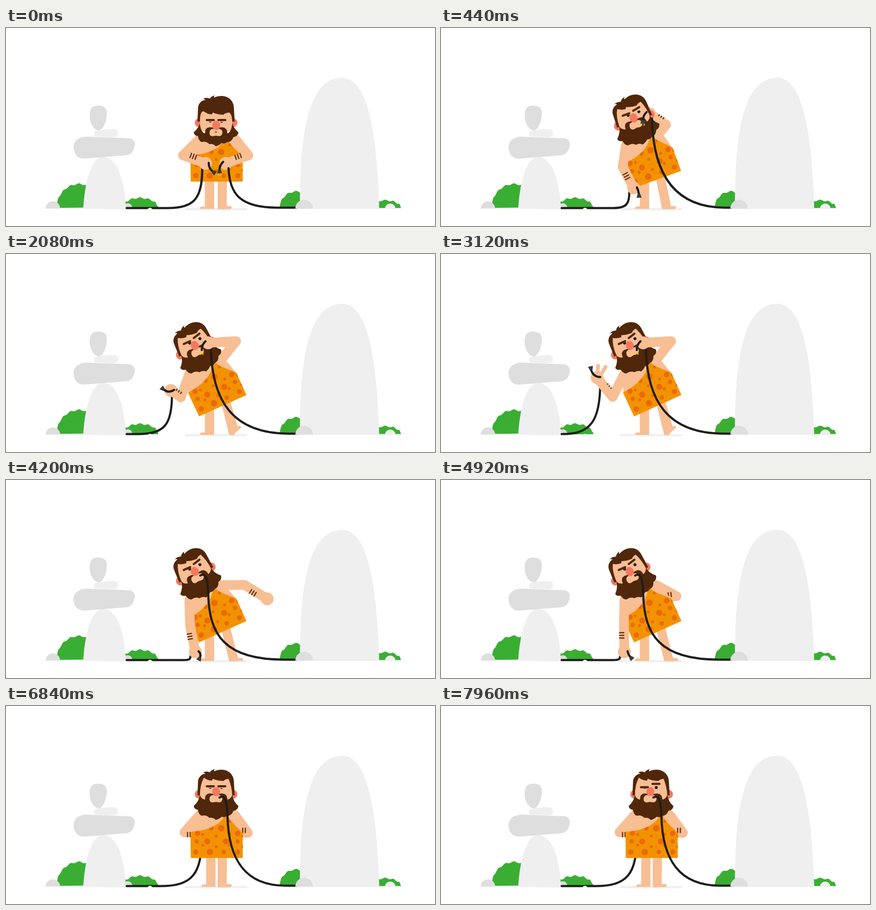
These frames come from a looping animation (800x370 px, 8000 ms). An HTML page with a canvas:

```html
<!DOCTYPE html>
<html lang="en">
<head>
<meta charset="utf-8">
<title>Caveman with a cable</title>
<style>
html, body { margin: 0; width: 100%; height: 100%; overflow: hidden; background: #fff; }
canvas { display: block; }
</style>
</head>
<body>
<canvas id="stage" width="800" height="370"></canvas>
<script>
const ctx = document.getElementById('stage').getContext('2d');
const LOOP = 8000, GROUND = 336.5;
const SKIN = '#f8be94', HAIR = '#50270a', PINK = '#f4795f', ORANGE = '#f39200', SPOT = '#ea6a0a';
const GREEN = '#3aae33', LIGHT = '#efefef', GREY = '#dedede', BLACK = '#1d1d1b', BAND = '#6b3410';

// Elbow x, y, hand x, y, stripe offset
// and for the left: cable offset, plug angle, plug length, plug bend
const LEFT = {
  hold: [330, 238, 372, 253, -5, -6, 1.1, 19, 5],
  ground: [343, 270, 353, 321, 5, -9, 1.4, 13, -5],
  raised: [320, 267, 291, 231, 12, 6, 3.86, 23, -9],
  rest: [341, 268, 342, 321, 5, -8, 1.1, 13, 2],
  hip: [333, 236, 358, 236, 5, 7, 1.1, 13, 2]
};
const RIGHT = {
  hold: [452, 238, 410, 253, 5],
  high: [404, 153, 378, 115, 14],
  mouth: [429, 163, 377, 166, 14],
  fling: [440, 172, 462, 121, 5],
  out: [445, 196, 487, 222, 5],
  side: [439, 217, 405, 222, 5],
  hip: [451, 237, 428, 237, 5]
};
// Start, end, pose reached
const LEFT_MOVES = [
  [120, 640, LEFT.ground], [1750, 2250, LEFT.raised], [3400, 3800, LEFT.ground],
  [4220, 4700, LEFT.rest], [5900, 6320, LEFT.hip]];
const RIGHT_MOVES = [
  [120, 640, RIGHT.high], [1480, 1780, RIGHT.mouth], [3400, 3620, RIGHT.fling],
  [3620, 3900, RIGHT.out], [4230, 4600, RIGHT.side], [5900, 6320, RIGHT.hip]];

function ramp(t, from, to) {
  const p = Math.min(1, Math.max(0, (t - from) / (to - from)));
  return p * p * (3 - 2 * p);
}

function poseAt(t, first, moves) {
  return moves.reduce((pose, [from, to, next]) => {
    const k = ramp(t, from, to);
    return pose.map((v, i) => v + (next[i] - v) * k);
  }, first);
}

function shape(color, d) {
  ctx.fillStyle = color;
  ctx.fill(new Path2D(d));
}

function line(color, width, d) {
  ctx.strokeStyle = color;
  ctx.lineWidth = width;
  ctx.lineCap = ctx.lineJoin = 'round';
  ctx.stroke(new Path2D(d));
}

function oval(color, x, y, rx, ry = rx, start = 0) {
  ctx.fillStyle = color;
  ctx.beginPath();
  ctx.ellipse(x, y, rx, ry, 0, start, Math.PI * 2);
  ctx.fill();
}

const dome = (color, x, y, r) => oval(color, x, y, r, r, Math.PI);

// Half ellipse with a rippled edge
function bush(x, rx, h) {
  ctx.fillStyle = GREEN;
  ctx.beginPath();
  for (let a = Math.PI; a <= Math.PI * 2 + .01; a += .04) {
    const ripple = 1.3 * Math.cos((a - Math.PI * 1.5) * rx / 2.6);
    ctx.lineTo(x + rx * Math.cos(a), Math.min(337.5, 337.5 + h * Math.sin(a) - ripple));
  }
  ctx.fill();
}

function scenery() {
  bush(136, 42, 46);
  bush(250, 34, 20);
  bush(541, 31, 32);
  bush(707, 30, 15.5);
  dome(GREY, 87.5, 337.5, 13.5);
  dome(GREY, 227, 336, 8.5);
  shape(LIGHT, 'M144,338C146,300 156,241 181,241C209,241 222,290 223.500,339Z');
  shape(LIGHT, 'M164,198C164,190 176,191 184,190C196,188 209,187 209,196C209,202 206,204 200,204L170,203Q164,203 164,198Z');
  shape(GREY, 'M126,223C126,211 135,203 152,203L229,206C238,207 241,213 240,219C238,232 233,237 222,238L147,244C133,245 126,234 126,223Z');
  shape(GREY, 'M156,164C156,150 161,145 172,145C184,145 189,151 188,161C187,178 180,191 173,191C164,191 156,178 156,164Z');
  shape(LIGHT, 'M548,338C548,220 557,93 627,93C680,93 692,220 696,338Z');
  dome(LIGHT, 716.5, 338, 10);
  line(LIGHT, 4, 'M335.500,338.500H448');
}

function legs(lean, lift, step) {
  const x = 379.5 + 2.5 * step;
  shape(SKIN, `M${x - 8.7},270H${x + 8.7}V338H${x - 18}Q${x - 18},333.500 ${x - 14},333.500H${x - 8.7}Z`);
  const top = 403.5 + 4 * lean, b = 403.5 + 21.5 * lean;
  shape(SKIN, `M${top - 8.7},268H${top + 8.7}L${b + 8},${334 - 8 * lift}L${b + 8 - 8 * lift},338.500H${b - 8.7}Z`);
  line(SKIN, 5.5, `M${b - 5 + 2 * lift},335.500L${b + 14.5 - 4 * lift},${335.5 - 12 * lift}`);
}

// Staggered rows, each large spot with a small one beside it; the top row follows the neckline
function spots() {
  for (let row = 0; row < 3; row++) {
    for (let col = 0; col < 4; col++) {
      const arch = row === 2 ? 5 - 11 * Math.sin(col * Math.PI / 3) : 0;
      const x = 354 + 26 * col + 5 * Math.sin(row * 2.2 * (3 - col)), y = 273 - 20 * row + arch;
      oval(SPOT, x, y, 5.1 + 1.1 * Math.sin(col * 2 + row * 4.8));
      oval(SPOT, 367 + 25 * col, y - 13 + 3 * (col % 2), 2.8);
    }
  }
}

function torso() {
  shape(SKIN, 'M357,194L429,194L441,238V275H345V236Z');
  const dress = new Path2D('M344.500,284L344,235C375,233 398,224 409,204L414,204C417,216 432,226 441.500,238V284Z');
  ctx.save();
  ctx.fillStyle = ORANGE;
  ctx.fill(dress);
  ctx.clip(dress);
  spots();
  ctx.restore();
}

function eye(x, y, open) {
  ctx.save();
  ctx.beginPath();
  ctx.rect(x - 5, y + 1.8 - 4 * open, 10, 9);
  ctx.clip();
  oval(BLACK, x, y + .5, 2.8);
  ctx.restore();
}

function head(nod, alert, wink, tongue) {
  const h = 5 * nod, f = 19 * nod, e = 9 * nod;
  for (const x of [360, 423.5]) oval(PINK, x + wink, 165 + e, 8, 8.3);
  shape(SKIN, `M362,${150 + h}Q362,${126 + h} 392,${126 + h}Q422,${126 + h} 422,${150 + h}V${185 + h}H362Z`);

  // Hair
  shape(HAIR, `M357,${167 + h}L358,${143 + h}C358,${134 + h} 363,${128 + h} 372,${126 + h}
    Q370,${124 + h} 367,${124.5 + h}Q373,${121 + h} 380,${124 + h}Q383,${119 + h} 390,${118 + h}
    Q387,${120 + h} 388,${122 + h}C405,${114 + h} 425,${122 + h} 425,${142 + h}L426.500,${167 + h}
    L422,${167 + h}Q421,${150 + h} 415,${136 + f}Q407,${137 + f} 406,${140 + f}Q394,${140 + f} 386,${136 + f}
    Q384,${138 + f} 384,${139.5 + f}Q376,${139 + f} 369,${134 + f}Q362,${146 + h} 361.500,${167 + h}Z`);

  // Beard with moustache
  shape(HAIR, `M361.500,${166 + e}Q360,${178 + h} 350,${187 + h}Q351,${193 + h} 358,${194 + h}
    Q359,${203 + h} 365,${205 + h}Q374,${203 + h} 379,${209 + h}Q387,${208 + h} 391,${213 + h}
    Q398,${211 + h} 402,${207 + h}Q408,${209 + h} 412,${205.500 + h}Q421,${205 + h} 424,${196 + h}
    Q432,${195 + h} 433.500,${187 + h}Q424,${179 + h} 422,${166 + e}Q420,${173 + f} 413,${175 + f}
    Q412,${164 + f} 404,${163.500 + f}Q397,${163 + f} 391.500,${167 + f}Q387,${163 + f} 379,${163.500 + f}
    Q371,${164 + f} 371,${175 + f}Q363,${173 + f} 361.500,${166 + e}Z`);

  ctx.save();
  ctx.translate(-1.6 * wink, f);
  shape(SKIN, 'M386,166.500H397C402,167 404,170 403.500,174C403,179 399,180.500 396,180Q391.500,178.500 387,180C382,181 379,178 379.500,173Q380,167 386,166.500Z');
  if (tongue) oval('#e30613', 383, 168.5, 4, 2.2);
  if (nod > .4) oval(BLACK, 391.5, 172.5, 1.2);

  const look = 4 * alert + wink;
  eye(381 + look, 151.3, .6 * alert);
  eye(402 + look, 151.8, alert + wink);
  const leftBrow = 150 - alert + 1.7 * wink, rightBrow = 150 - 5 * alert - 4.5 * wink;
  line(HAIR, 4, `M374.500,${leftBrow}H387.500`);
  line(HAIR, 4, `M396,${rightBrow + 1.5 * alert}L409,${rightBrow - 1.5 * alert}`);
  oval(PINK, 392, 160, 7.4, 8.6);
  ctx.restore();
}

function forearm([ex, ey, hx, hy]) {
  line(SKIN, 18, `M${ex},${ey}L${hx},${hy}`);
  oval(SKIN, hx, hy, 12);
}

function arm(shoulder, pose) {
  const [ex, ey, hx, hy, off] = pose;
  line(SKIN, 18, `M${shoulder}L${ex},${ey}`);
  forearm(pose);
  // Stripes wrap round the arm and vanish past its edge
  const from = Math.max(-9, off - 4.5), to = Math.min(8.5, off + 4.5);
  if (from > to) return;
  ctx.save();
  ctx.translate(ex + (hx - ex) * .42, ey + (hy - ey) * .42);
  ctx.rotate(Math.atan2(hy - ey, hx - ex));
  for (let x = -5; x <= 5; x += 5) line(BAND, 2.3, `M${x},${from}V${to}`);
  ctx.restore();
}

function fingers([, , x, y], k) {
  line(SKIN, 7, `M${x},${y}L${x + 2 * k},${y - 22 * k}M${x + 4},${y}L${x + 4 + 12 * k},${y - 20 * k}`);
}

// Bent cable end; bend is the sideways pull of its middle
function plug(x, y, angle, length, bend, prongs, bare) {
  ctx.save();
  ctx.translate(x, y);
  ctx.rotate(angle);
  line(BLACK, 4, `M0,0Q${length / 2},${bend} ${length},0`);
  ctx.translate(length, 0);
  ctx.rotate(Math.atan2(-bend, length / 2));
  if (prongs) line('#ffd500', 1.8, 'M5,-2.200H8M5,2.200H8');
  if (!bare) shape('#3c3c3b', 'M-2,-2.500L5,-4.700V4.700L-2,2.500Z');
  ctx.restore();
}

function leftCord([, , hx, hy, , offset]) {
  const x = hx + offset, y = hy + 8, h = GROUND - y;
  line(BLACK, 4, `M225,${GROUND}H${Math.max(226, x - 8 - .75 * h)}
    C${x - .18 * h},${GROUND} ${x},${y + .75 * h} ${x},${y}`);
}

// Falls from a point and runs out along the ground
function rightCord(x, y, hook) {
  let d = `M${x},${y}`;
  if (hook) {
    d += `C${x + 11},${y - 6} ${x + 14},${y + 7} ${x + 15},${y + 35}`;
    x += 15;
    y += 35;
  }
  const h = 335.7 - y;
  line(BLACK, 4, `${d}C${x + 2},${y + .62 * h} ${x + .25 * h},335.700 ${488 + .25 * h},335.700H542`);
}

function draw(t) {
  ctx.fillStyle = '#fff';
  ctx.fillRect(0, 0, 800, 370);
  scenery();

  const rise = ramp(t, 5900, 6320), lean = ramp(t, 120, 560) - rise;
  const nod = 1 - ramp(t, 120, 480), wink = ramp(t, 7520, 7720);
  const lift = ramp(t, 450, 680) - ramp(t, 3600, 3900);
  const spread = ramp(t, 2050, 2250) - ramp(t, 3350, 3500);
  const left = poseAt(t, LEFT.hold, LEFT_MOVES), right = poseAt(t, RIGHT.hold, RIGHT_MOVES);
  const leftBack = t > 6130, rightBack = t > 4430;
  const atMouth = t > 1540 && t < 3680, holding = t < 3480;

  const angle = -24.4 * Math.PI / 180 * lean, cos = Math.cos(angle), sin = Math.sin(angle);
  const px = 393 + 11 * lean, py = 283.5 - .5 * lean + 3 * nod;
  const place = (x, y) => [px + (x - 393) * cos - (y - 283.5) * sin, py + (x - 393) * sin + (y - 283.5) * cos];
  const posed = fn => {
    ctx.save();
    ctx.translate(px, py);
    ctx.rotate(angle);
    ctx.translate(-393, -283.5);
    fn();
    ctx.restore();
  };
  const leftArm = () => {
    leftCord(left);
    arm(place(361, 204), left);
    if (spread) fingers(left, spread);
  };
  const rightArm = () => arm(place(427, 204), right);

  legs(lean, lift, rise);
  if (leftBack) leftArm();
  if (rightBack) rightArm();
  posed(torso);
  if (!leftBack) leftArm();
  if (!rightBack) rightArm();
  posed(() => head(nod, lean, wink, t > 560 && t < 1700));

  if (holding) rightCord(right[2] + 5, right[3] + 9, false);
  else rightCord(...place(398 - 2 * wink, 171), true);
  if (atMouth) forearm(right);
  if (!leftBack) plug(left[2] + 6, left[3] - 1, ...left.slice(6));
  if (holding) plug(right[2] - 5, right[3] - 3, 1.97, 18, 4, true, t > 1720);

  dome('#f6f6f6', 268.5, 341, 5);
  dome(GREY, 556, 337.5, 16.5);
}

function tick(now) {
  draw(now % LOOP);
  requestAnimationFrame(tick);
}
draw(0);
requestAnimationFrame(tick);
</script>
</body>
</html>
```
